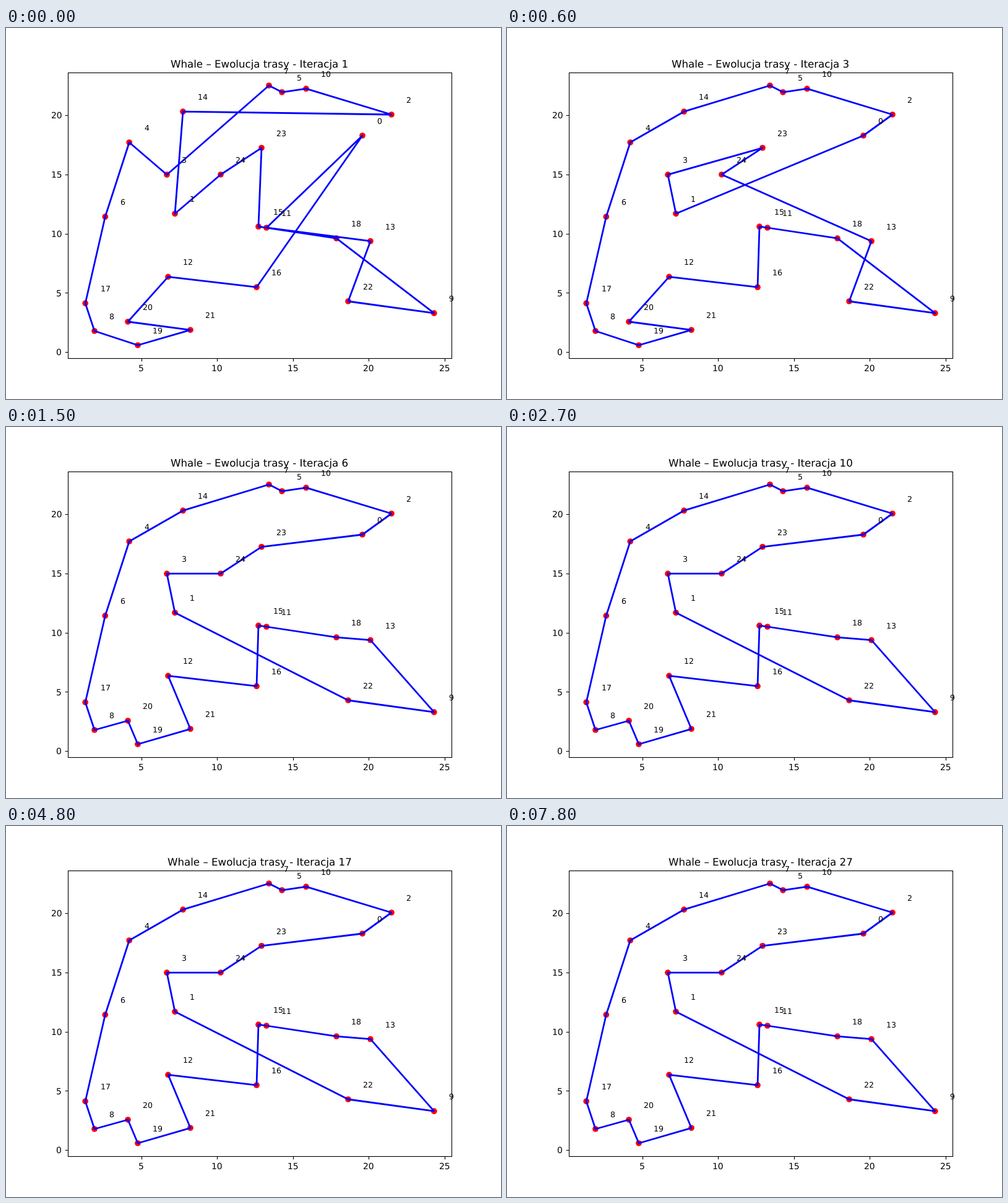
An HTML page with a canvas for the animation above (8000 ms loop, 800 by 600 pixels).

```html
<!DOCTYPE html>
<html lang="pl">
<head>
<meta charset="utf-8">
<style>
html, body { margin: 0; width: 100%; height: 100%; overflow: hidden; background: #fff; }
canvas { display: block; width: 800px; height: 600px; }
</style>
</head>
<body>
<canvas id="plot" width="800" height="600"></canvas>
<script>
const ctx = document.getElementById('plot').getContext('2d');
const LOOP = 8000, STEP = 300;
const PT = 100 / 72; // pixels per point
const UNIT_X = 24.5, UNIT_Y = 19.155;
const toX = v => 96.2 + UNIT_X * v;
const toY = v => 524.2 - UNIT_Y * v;

const cities = [
  [576, 174], [273, 300.3], [623, 140], [260, 237.2], [199.2, 185],
  [446, 103.8], [160.3, 305.2], [425, 93], [143, 490], [691.8, 461.2],
  [485, 98.2], [421, 323], [262, 402.4], [589, 344.7], [286, 135.2],
  [408, 321.2], [405, 419.2], [128.2, 445.2], [534, 340.2], [213, 513],
  [197, 475], [298, 488.3], [553, 442], [413, 193.8], [347, 237]
];

const firstTour = [2, 14, 1, 24, 23, 15, 18, 9, 22, 13, 11, 0, 16, 12, 20, 21, 19, 8, 17, 6, 4, 3, 7, 5, 10];

// Each iteration moves some cities: [city, new predecessor]
const moves = {
  2: [[14, 4], [3, 1], [0, 2], [23, 3]],
  3: [[13, 24], [22, 13], [9, 22], [15, 11]],
  4: [[20, 19], [13, 9]],
  5: [[23, 0], [24, 23], [3, 24]]
};

function tourAt(iteration) {
  let tour = firstTour;
  for (let i = 2; i <= iteration; i++) {
    for (const [city, before] of moves[i] || []) {
      tour = tour.filter(c => c !== city);
      tour.splice(tour.indexOf(before) + 1, 0, city);
    }
  }
  return tour;
}

// anchor: 0 = left, 0.5 = centre, 1 = right
function text(str, x, y, size, anchor = 0) {
  ctx.font = `${size * PT}px "DejaVu Sans", sans-serif`;
  ctx.textRendering = 'geometricPrecision';
  const left = x - anchor * ctx.measureText(str).width;
  ctx.fillText(str, Math.round(left), Math.round(y));
}

function line(x1, y1, x2, y2) {
  ctx.beginPath();
  ctx.moveTo(x1, y1);
  ctx.lineTo(x2, y2);
  ctx.stroke();
}

function drawCities() {
  ctx.fillStyle = '#f00';
  for (const [x, y] of cities) {
    ctx.beginPath();
    ctx.arc(x, y, 3.5 * PT, 0, 2 * Math.PI);
    ctx.fill();
  }
}

function drawTour(tour) {
  ctx.strokeStyle = '#00f';
  ctx.lineWidth = 2 * PT;
  ctx.lineJoin = 'round';
  ctx.beginPath();
  for (const i of tour) ctx.lineTo(...cities[i]);
  ctx.closePath();
  ctx.stroke();
}

function drawAxes() {
  const snap = v => Math.round(v) + 0.5;
  const tick = 3.5 * PT;
  ctx.strokeStyle = ctx.fillStyle = '#000';
  ctx.lineWidth = 0.8 * PT;
  ctx.lineJoin = 'miter';
  ctx.strokeRect(100.5, 72.5, 620, 462);
  for (let v = 5; v <= 25; v += 5) {
    const x = snap(toX(v));
    line(x, 534.5, x, 534.5 + tick);
    text(v, toX(v), 555, 10, 0.5);
  }
  for (let v = 0; v <= 20; v += 5) {
    const y = snap(toY(v));
    line(100.5 - tick, y, 100.5, y);
    text(v, 90.3, toY(v) + 5.2, 10, 1);
  }
}

function draw(iteration) {
  ctx.fillStyle = '#fff';
  ctx.fillRect(0, 0, 800, 600);
  drawCities();
  drawTour(tourAt(iteration));
  drawAxes();
  cities.forEach(([x, y], i) => text(i, x + UNIT_X - 0.1, y - UNIT_Y, 9));
  text(`Whale – Ewolucja trasy - Iteracja ${iteration}`, 410, 64, 12, 0.5);
}

const start = performance.now();
let shown = 0;
function tick(now) {
  const t = Math.max(0, now - start) % LOOP;
  const iteration = Math.floor(t / STEP) + 1;
  if (iteration !== shown) draw(shown = iteration);
  requestAnimationFrame(tick);
}
tick(start);
</script>
</body>
</html>
```
